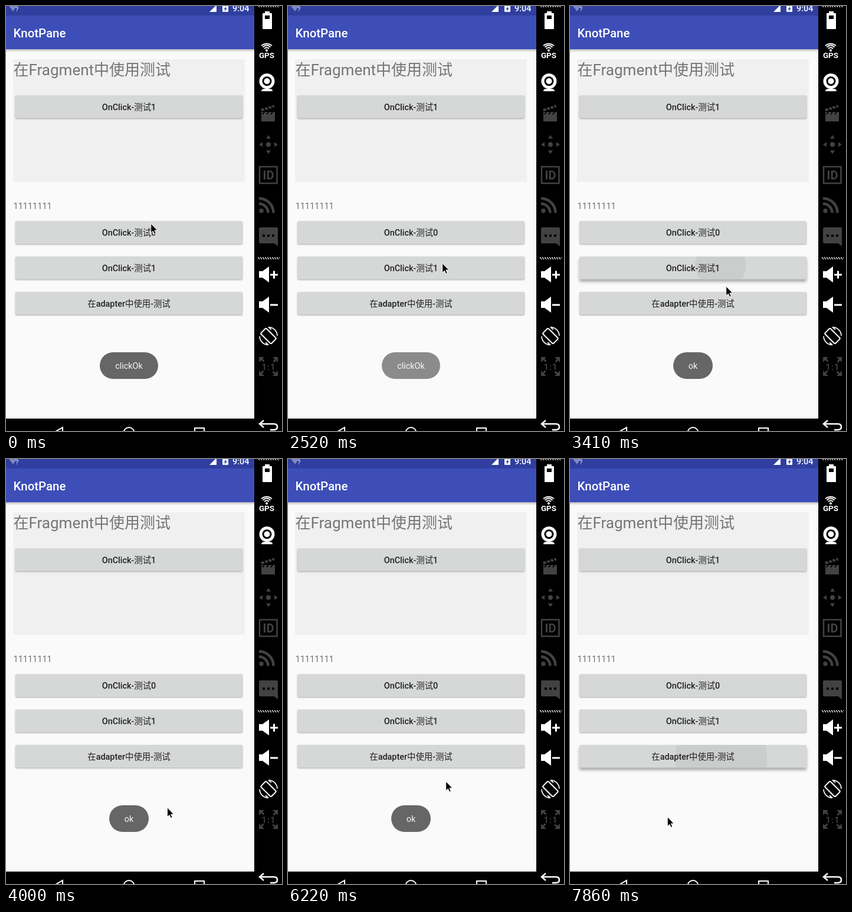
An HTML page that plays this animation: 468x718 px, repeating every 8 s.

```html
<!DOCTYPE html>
<html lang="zh-CN">
<head>
<meta charset="utf-8">
<style>
html, body { margin: 0; width: 100%; height: 100%; overflow: hidden; background: #000; }
svg { display: block; width: 468px; height: 718px; }
text { font-family: Roboto, "Noto Sans CJK SC", "Noto Sans CJK", sans-serif; font-size: 14.4px; }
.mid { text-anchor: middle; }
.bold { font-weight: 500; }
.button { fill: #d6d7d7; filter: drop-shadow(0 1px 1px #0005); }
.button.lifted { filter: drop-shadow(0 4px 2.5px #0005); }
.label { fill: #212121; font-weight: 500; text-anchor: middle; }
.line { fill: none; stroke: currentColor; }
.white { color: #fff; fill: #fff; }
.dim { color: #424242; fill: #424242; }
.white .line, .dim .line { fill: none; }
</style>
</head>
<body>
<svg viewBox="0 0 468 718">
  <defs>
    <linearGradient id="fade" x2="0" y2="1">
      <stop stop-color="#000" stop-opacity=".25"/>
      <stop offset="1" stop-color="#000" stop-opacity="0"/>
    </linearGradient>
    <pattern id="hatch" width="4" height="5" patternUnits="userSpaceOnUse" x="427" y="424">
      <path d="M0 0l3 4" stroke="#ccc" stroke-width="1.5"/>
    </pattern>
    <clipPath id="clip"><rect id="clipBox" x="16" width="385" height="38" rx="2"/></clipPath>
  </defs>

  <!-- App -->
  <rect width="421" height="697" fill="#fafafa"/>
  <rect y="73" width="421" height="5" fill="url(#fade)"/>
  <rect width="421" height="73" fill="#3d4eb8"/>
  <rect width="421" height="16" fill="#303f9f"/>
  <path d="M5 0H18L12 9Z" fill="#8088c4"/>
  <text x="16" y="9" fill="#fff" style="font-size:11px">?</text>
  <path d="M345 10L357 -2V10Z" class="white"/>
  <rect x="367" y="-3" width="10" height="13" rx="1" fill="#fff"/>
  <path d="M373.5 0L369.5 5.5H371.7L370.7 9.5L374.8 3.8H372.5Z" fill="#303f9f"/>
  <text x="384" y="9" class="white bold">9:04</text>
  <text x="12.5" y="52.5" class="white bold" style="font-size:20.4px">KnotPane</text>
  <rect x="12" y="90" width="393" height="207" fill="#f0f0f0"/>
  <text x="12.5" y="117.3" fill="#757575" style="font-size:26px">在Fragment中使用测试</text>
  <text x="12.5" y="343" fill="#707070" style="font-size:14.5px">11111111</text>
  <g id="buttons"></g>
  <circle id="ripple" clip-path="url(#clip)"/>
  <g id="labels"></g>
  <g id="toast">
    <rect y="585" height="45" rx="22.5" fill="#666"/>
    <text x="208.5" y="613" class="mid" fill="#f5f5f5"></text>
  </g>

  <!-- Navigation bar and side panel -->
  <rect y="697" width="421" height="21"/>
  <rect x="421" width="47" height="718"/>
  <g class="white" stroke-width="2">
    <path class="line" d="M96 724V712L82 720"/>
    <circle class="line" cx="208.5" cy="721" r="9"/>
    <rect class="line" x="320" y="713" width="16" height="16"/>
  </g>
  <rect id="strip" x="427" y="424" width="37" height="5" fill="url(#hatch)"/>
  <use href="#strip" y="-426"/>

  <g class="white">
    <path d="M439 9h8v3h3q1 0 1 1v25q0 1-1 1h-14q-1 0-1-1V13q0-1 1-1h3ZM439 16v6h8v-6Z" fill-rule="evenodd"/>
    <circle cx="442" cy="75" r="2"/>
    <path class="line" stroke-width="2" d="M438 72q4-3.5 8 0M435.5 69.5q6.5-6 13 0M433 67q9-6.500 18 0"/>
    <text x="442" y="87.5" class="mid" style="font-size:13.5px;font-weight:700">GPS</text>
    <circle cx="442.500" cy="127" r="13"/>
    <circle cx="442.5" cy="127" r="6.5" class="line" style="color:#000" stroke-width="3"/>
    <path d="M433 144q0-4 5-4h9q5 0 5 4Z"/>
    <path id="speaker" d="M429 448h6l11-8v27l-11-8h-6Z"/>
    <use href="#speaker" y="51"/>
    <path class="line" stroke-width="3" d="M448 454h13M454.5 447.5v13M448 505h13"/>
    <g stroke-width="2">
      <rect class="line" x="438.5" y="545" width="13" height="25" rx="2" transform="rotate(-45 445 557.5)"/>
      <path id="turn" class="line" stroke-width="1.7" d="M445 542.5a15 15 0 0 1 15 14.500M445 542.5l5 4"/>
      <use href="#turn" transform="rotate(180 445 557.5)"/>
      <path class="line" stroke-width="2.5" d="M437 700l-7 6 7 6M431 706h23q6 0 6 5t-6 5h-6"/>
    </g>
  </g>

  <g class="dim">
    <path d="M433 179h23v16h-23ZM432 174l22-7 1.5 4-22 7Z"/>
    <path d="M437 172l3 4M443 170l3 4M449 168l3 4M438 179l-3 4M445 179l-3 4M452 179l-3 4" stroke="#000" stroke-width="2"/>
    <circle cx="445" cy="234" r="4"/>
    <path d="M445 218l4 6h-8ZM445 250l4-6h-8ZM429 234l6-4v8ZM461 234l-6-4v8Z"/>
    <rect class="line" x="430" y="271.5" width="29.5" height="28" stroke-width="2.5"/>
    <text x="445" y="293" class="mid" style="font-size:20px;font-weight:700">ID</text>
    <circle cx="433" cy="346" r="3.7"/>
    <path class="line" stroke-width="4.5" d="M429 334a15.5 15.5 0 0 1 15.5 15.5M429 325a24.5 24.5 0 0 1 24.5 24.5"/>
    <path d="M431 374h28q2 0 2 2v30l-6-5h-24q-2 0-2-2v-23q0-2 2-2Z"/>
    <path d="M435 388h4m4 0h4m4 0h4" stroke="#000" stroke-width="4"/>
    <path id="corner" d="M429 593h9l-3 3 3.5 3.500-2 2-3.500-3.500-4 4Z"/>
    <use href="#corner" transform="rotate(90 445 609)"/>
    <use href="#corner" transform="rotate(180 445 609)"/>
    <use href="#corner" transform="rotate(270 445 609)"/>
    <text x="445.500" y="614.5" class="mid bold" style="font-size:15px;letter-spacing:1px">1:1</text>
  </g>

  <path id="cursor" d="M-.3 .5V16.5L3.3 13.2L5.800 18.500L8.300 17.300L5.900 12H10.800Z" stroke="#fff" stroke-linejoin="round"/>
</svg>
<script>
const LOOP = 8000, STEPS = 54;
const $ = id => document.getElementById(id);
const set = (el, attrs) => { for (const k in attrs) el.setAttribute(k, attrs[k]); return el; };
const add = (parent, tag, attrs) =>
  $(parent).appendChild(set(document.createElementNS('http://www.w3.org/2000/svg', tag), attrs));

const buttons = [
  [151, 'OnClick-测试1'], [363.5, 'OnClick-测试0'], [423.3, 'OnClick-测试1'], [483, '在adapter中使用-测试']
].map(([y, label]) => {
  add('labels', 'text', { class: 'label', x: 208.5, y: y + 24.5 }).textContent = label;
  return { y, el: add('buttons', 'rect', { class: 'button', x: 16, y, width: 385, height: 38.5, rx: 2 }) };
});

// Pointer path: step, x, y
const path = [
  [0, 246, 367], [1, 246, 366], [2, 247, 358], [6, 253, 416], [8, 256, 424], [10, 262, 434],
  [22, 262, 434], [26, 274, 590], [28, 273.5, 586.5], [30, 268, 593], [33, 268, 593],
  [41, 266, 548], [42, 268, 544], [47, 272, 506], [51, 272, 506], [53, 165.5, 604]
];
const taps = [
  { step: 1, button: 1, x: 246, y: 368, lift: false },
  { step: 22, button: 2, x: 262, y: 436, lift: true },
  { step: 51, button: 3, x: 272, y: 507, lift: true }
];

function pointer(step) {
  const i = Math.max(1, path.findIndex(p => p[0] >= step));
  const [a, x0, y0] = path[i - 1], [b, x1, y1] = path[i];
  const k = (step - a) / (b - a);
  return [x0 + (x1 - x0) * k, y0 + (y1 - y0) * k];
}

const clamp = v => Math.min(1, Math.max(0, v));

function drawToast(step) {
  const first = step < 19;
  const width = first ? 99 : 67;
  const [box, text] = $('toast').children;
  set(box, { x: 208.5 - width / 2, width });
  text.textContent = first ? 'clickOk' : 'ok';
  const alpha = first ? clamp((18.5 - step) / 2) : Math.min(clamp((step - 18) / 2), clamp((46 - step) / 3));
  set($('toast'), { opacity: alpha });
}

function drawTaps(step) {
  const tap = taps.find(t => step >= t.step && step < t.step + 4);
  const age = tap ? step - tap.step : 0;
  buttons.forEach((b, i) =>
    b.el.classList.toggle('lifted', !!tap && tap.lift && age > 0 && i === tap.button));
  if (!tap) return set($('ripple'), { opacity: 0 });
  const top = buttons[tap.button].y, drift = age / 8;
  set($('clipBox'), { y: top });
  set($('ripple'), {
    cx: tap.x + (208.5 - tap.x) * drift,
    cy: tap.y + (top + 19 - tap.y) * drift,
    r: 8 + 35 * age,
    opacity: age < 3 ? .05 : .025
  });
}

function draw(now) {
  const step = Math.floor(now % LOOP * STEPS / LOOP + .05) % STEPS;
  set($('cursor'), { transform: `translate(${pointer(step)})` });
  drawToast(step);
  drawTaps(step);
  requestAnimationFrame(draw);
}
draw(0);
</script>
</body>
</html>
```
